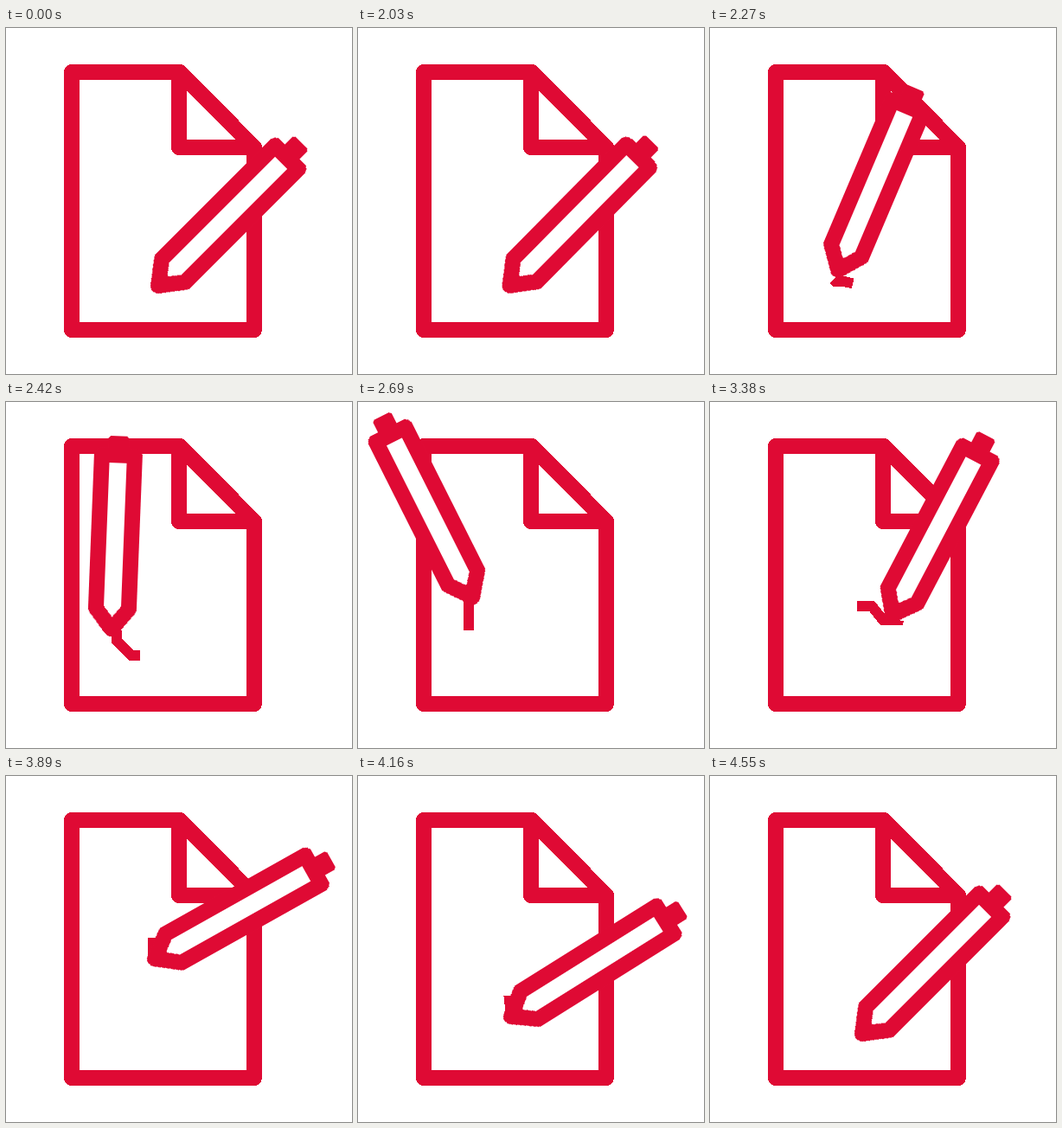
Write an HTML page without scripts that moves like this. It is 400x400 px and loops after 4.58 s.

```html
<!DOCTYPE html>
<html lang="en">
<head>
<meta charset="utf-8">
<title>Signing a document</title>
<style>
  html, body { margin: 0; width: 100%; height: 100%; overflow: hidden; background: #fff; }
  svg { display: block; width: 100vw; height: 100vh; shape-rendering: crispEdges; }

  .line { fill: #fff; stroke: #df0a34; stroke-width: 18; stroke-linejoin: round; }
  .cap { fill: #df0a34; }
  .ink {
    fill: none; stroke: #df0a34; stroke-width: 12;
    animation: write 4580ms linear infinite;
  }
  .pen { transform-origin: 0 0; animation: sign 4580ms linear infinite; }

  /* The pen's origin is its tip; it looks shorter when upright. */
  @keyframes sign {
    0%     { transform: translate(176px, 298px) rotate(45deg) scaleY(1); }
    43.7%  { transform: translate(176px, 298px) rotate(45deg) scaleY(1);
             animation-timing-function: cubic-bezier(.4, 0, .8, .8); }
    52.84% { transform: translate(122px, 263px) rotate(2.4deg) scaleY(.955); }
    55.46% { transform: translate(121px, 240px) rotate(-18deg) scaleY(.99); }
    57.64% { transform: translate(128px, 228px) rotate(-25deg) scaleY(1); }
    60.26% { transform: translate(138px, 222px) rotate(-29deg) scaleY(1); }
    65.94% { transform: translate(184px, 238px) rotate(-28.5deg) scaleY(1); }
    67.25% { transform: translate(198px, 242px) rotate(-20deg) scaleY(.99); }
    69.21% { transform: translate(172px, 238px) rotate(-5deg) scaleY(.955); }
    73.8%  { transform: translate(211px, 246px) rotate(27.6deg) scaleY(1); }
    75.98% { transform: translate(218px, 237px) rotate(37deg) scaleY(1); }
    79.04% { transform: translate(195px, 215px) rotate(47deg) scaleY(1); }
    81.66% { transform: translate(180px, 195px) rotate(57deg) scaleY(1); }
    82.97% { transform: translate(169px, 191px) rotate(60deg) scaleY(1); }
    84.93% { transform: translate(172px, 211px) rotate(60.7deg) scaleY(1); }
    90.83% { transform: translate(177px, 278px) rotate(58deg) scaleY(1);
             animation-timing-function: ease-out; }
    99.34%, 100% { transform: translate(176px, 298px) rotate(45deg) scaleY(1); }
  }

  /* Second value: start of the wet ink; third: its length. */
  @keyframes write {
    0%     { stroke-dasharray: 0 0 0 999; }
    43.7%  { stroke-dasharray: 0 0 0 999;
             animation-timing-function: cubic-bezier(.4, 0, .8, .8); }
    52.84% { stroke-dasharray: 0 21.6 46 999; }
    65.94% { stroke-dasharray: 0 123.6 62 999; }
    73.8%  { stroke-dasharray: 0 229.6 55.6 999; }
    84.93% { stroke-dasharray: 0 373 25 999; }
    90.83% { stroke-dasharray: 0 440 24 999; animation-timing-function: ease-out; }
    99.34%, 100% { stroke-dasharray: 0 484 0 999; }
  }
</style>
</head>
<body>
<svg viewBox="0 0 400 400">
  <path class="line" d="M201 51H76V349H287V138Z"/>
  <path class="line" d="M200 51V138H287Z"/>
  <path class="ink" d="M176 298L155 293H145L128 276V210H138L150 220L184 239L198 243L170 236H187L200 252H218L222 238L195 214L180 194L170 187V212L177 278L175 298"/>
  <g class="pen">
    <rect class="cap" x="-12" y="-234" width="24" height="24" rx="4"/>
    <path class="line" d="M0 0L-19 -25V-210.5H19V-25Z"/>
  </g>
</svg>
</body>
</html>
```
